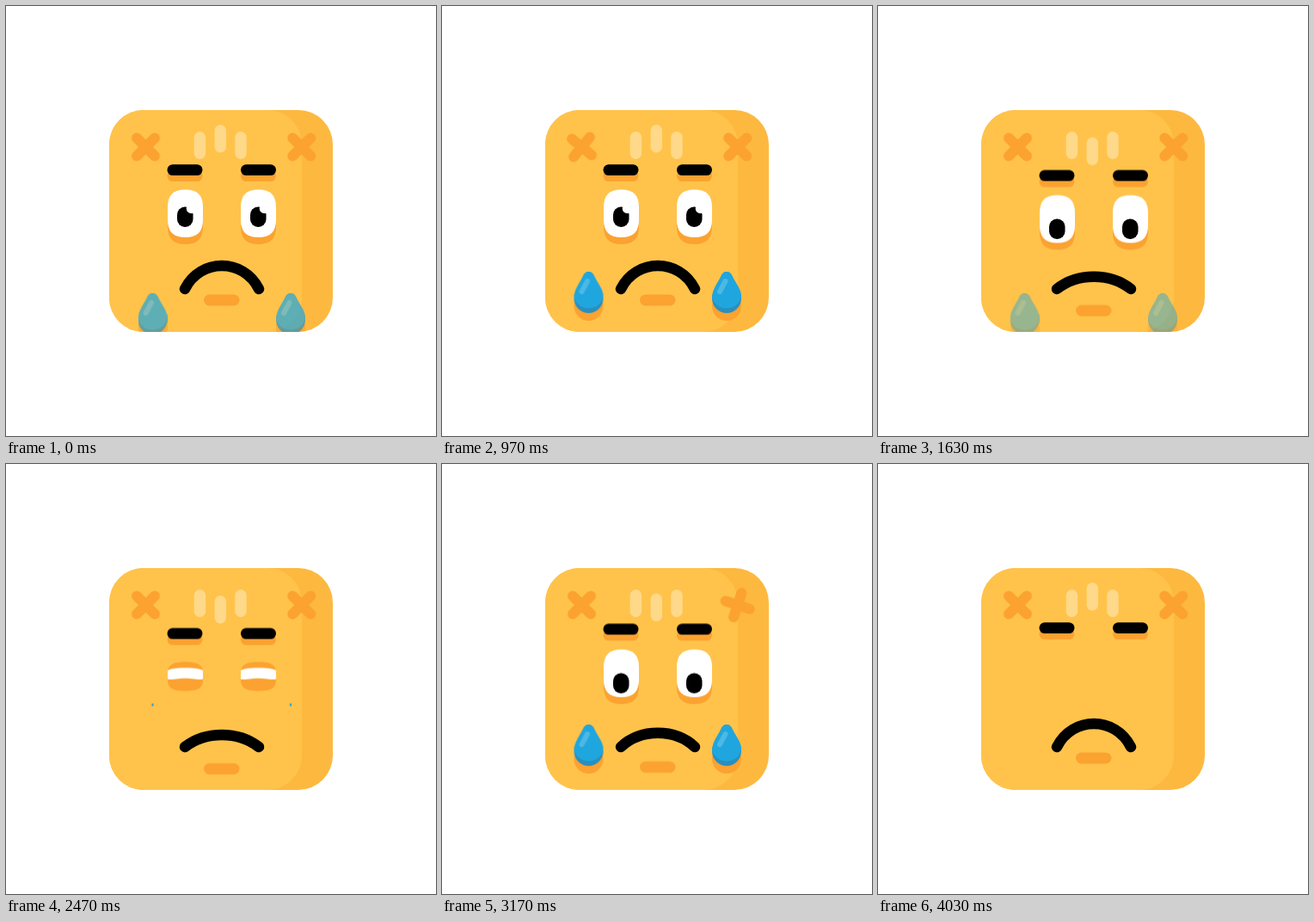
These frames come from a looping animation (500 px wide and 500 px high, 4060 ms). An HTML page without scripts:

```html
<!DOCTYPE html>
<html lang="en">
<head>
<meta charset="utf-8">
<title>Crying face</title>
<style>
html, body { margin: 0; width: 100%; height: 100%; overflow: hidden; background: #fff; }
svg { display: block; width: 100vw; height: 100vh; }

.shade { fill: #fba230; }
.cross { fill: none; stroke: #fba230; stroke-width: 12; stroke-linecap: round; }
.ray { fill: #ffd98a; }
.mouth { fill: none; stroke: #000; stroke-width: 12.5; stroke-linecap: round; }

.brows, .eyes, .look, .glint, .ray-mid, .chin, .mouth {
  animation: 4060ms ease-in-out infinite;
}
.lid, .white, .pupil, .fall, .drop, .turn-l, .turn-r {
  animation: 4060ms linear infinite;
}

/* Pose: up at both ends of the loop, down in the middle */
.brows { animation-name: brows; }
.eyes { animation-name: eyes; }
.ray-mid { animation-name: ray; }
.chin { animation-name: chin; }
.mouth { animation-name: mouth; }
@keyframes brows {
  0%, 25.86% { transform: none; }
  35.71%, 71.43% { transform: translateY(6.5px); }
  81.28%, 100% { transform: none; }
}
@keyframes eyes {
  0%, 25.86% { transform: none; }
  36.95%, 71.43% { transform: translateY(6.5px); }
  82.51%, 100% { transform: none; }
}
@keyframes ray {
  0%, 27.09% { transform: none; }
  41.87%, 73.89% { transform: translateY(15px); }
  88.67%, 100% { transform: none; }
}
@keyframes chin {
  0%, 27.09% { transform: none; }
  41.87%, 73.89% { transform: translateY(12.5px); }
  88.67%, 100% { transform: none; }
}
@keyframes mouth {
  0%, 27.09% { d: path("M208 329C226 293 276 293 294 329"); }
  41.87%, 73.89% { d: path("M208 329C232 310.3 270 310.3 294 329"); }
  88.67%, 100% { d: path("M208 329C226 293 276 293 294 329"); }
}

/* Gaze */
.look { animation-name: look; }
.glint { animation-name: glint; transform-origin: 215.5px 235.5px; }
@keyframes look {
  0%, 25.86% { transform: none; }
  36.95%, 83.74% { transform: translateY(7.5px); }
  93.6%, 100% { transform: none; }
}
@keyframes glint {
  0%, 25.86% { transform: none; }
  36.95%, 83.74% { transform: scale(0); }
  93.6%, 100% { transform: none; }
}

/* Blink: closed, slit, half, open */
.lid { fill: #fba230; animation-name: lid; }
.white { fill: #fff; animation-name: white; }
.pupil { transform-origin: 208.5px 240px; animation-name: pupil; }
@keyframes lid {
  0%, .738%, 16%, 47.78%, 65%, 97% {
    d: path("M188 242C188 228 194.5 221.5 208.5 221.5C222.5 221.5 229 228 229 242L229 256.5C229 270.5 222.5 277 208.5 277C194.5 277 188 270.5 188 256.5Z");
  }
  11.82%, 49.3%, 60.84%, 98.2% {
    d: path("M188 236C188 227 194.5 223.5 208.5 223.5C222.5 223.5 229 227 229 236L229 245C229 254 222.5 257.5 208.5 257.5C194.5 257.5 188 254 188 245Z");
  }
  10.59%, 59.6% {
    d: path("M188 233C188 225.5 194.5 223 208.5 223C222.5 223 229 225.5 229 233L229 234C229 241.5 222.5 244 208.5 244C194.5 244 188 241.5 188 234Z");
  }
  .739%, 9.11%, 50%, 58.1%, 99.2%, 100% {
    d: path("M188 233C188 233 194.5 233 208.5 233C222.5 233 229 233 229 233L229 233C229 233 222.5 233 208.5 233C194.5 233 188 233 188 233Z");
  }
}
@keyframes white {
  0%, .738%, 16%, 47.78%, 65%, 97% {
    d: path("M188 234C188 220 194.5 213.5 208.5 213.5C222.5 213.5 229 220 229 234L229 248.5C229 262.5 222.5 269 208.5 269C194.5 269 188 262.5 188 248.5Z");
  }
  11.82%, 49.3%, 60.84%, 98.2% {
    d: path("M188 234C188 232 198 230.5 208.5 230.5C219 230.5 229 232 229 234L229 243C229 245.5 219 242.5 208.5 242.5C198 242.5 188 245.5 188 243Z");
  }
  .739%, 10.59%, 50%, 59.6%, 99.2%, 100% {
    d: path("M188 237C188 237 198 237 208.5 237C219 237 229 237 229 237L229 237C229 237 219 237 208.5 237C198 237 188 237 188 237Z");
  }
}
@keyframes pupil {
  0%, .738%, 16%, 47.78%, 65%, 97% { transform: none; }
  .739%, 11.82%, 49.3%, 60.84%, 98.2%, 100% { transform: scale(0); }
}

/* Tears: two drops per loop */
.fall { animation-name: fall; }
.drop { transform-origin: 0 2px; animation-name: drop; }
@keyframes fall {
  0%, .738% { transform: translateY(334px); }
  .739%, 2.71% { transform: translateY(276.4px); }
  42.12% { transform: translateY(337px); }
  42.13%, 60.3% { transform: translateY(275.6px); }
  99.26%, 100% { transform: translateY(335.6px); }
}
@keyframes drop {
  0%, .738% { transform: none; opacity: .72; }
  .739%, 2.71% { transform: scale(0); opacity: 1; }
  11.33%, 37.93% { transform: none; opacity: 1; }
  42.12% { transform: none; opacity: 0; }
  42.13%, 60.3% { transform: scale(0); opacity: 1; }
  68.9%, 95.07% { transform: none; opacity: 1; }
  99.26%, 100% { transform: none; opacity: 0; }
}

/* Cheek crosses: half a turn each */
.turn-l { animation-name: turn-l; }
.turn-r { animation-name: turn-r; }
@keyframes turn-l {
  0%, 15.2% { transform: rotate(0deg); }
  33.8%, 100% { transform: rotate(180deg); }
}
@keyframes turn-r {
  0%, 71.55% { transform: rotate(0deg); }
  90.17%, 100% { transform: rotate(180deg); }
}
</style>
</head>
<body>
<svg viewBox="0 0 500 500">
  <defs>
    <clipPath id="head"><rect x="120" y="121" width="260" height="258" rx="40"/></clipPath>
    <path id="tear" d="M0 0C3 0 5 1.5 6.5 5C9.5 12 17 20.5 17 31A17 17 0 0 1 -17 31C-17 20.5 -9.5 12 -6.5 5C-5 1.5 -3 0 0 0Z"/>
    <path id="x" d="M-10.5 -10.5L10.5 10.5M10.5 -10.5L-10.5 10.5"/>
  </defs>

  <g clip-path="url(#head)">
    <rect x="120" y="121" width="260" height="258" fill="#fdb93f"/>
    <path d="M120 121H304A40 40 0 0 1 344 161V339A40 40 0 0 1 304 379H120Z" fill="#ffc34b"/>
  </g>

  <g class="cross">
    <g transform="translate(162.5 164)"><use href="#x" class="turn-l"/></g>
    <g transform="translate(343.7 164)"><use href="#x" class="turn-r"/></g>
  </g>

  <g class="ray">
    <rect x="218.7" y="146" width="13.4" height="32" rx="6.7"/>
    <rect class="ray-mid" x="242.6" y="138" width="13.4" height="32.5" rx="6.7"/>
    <rect x="266.3" y="146" width="13.4" height="32" rx="6.7"/>
  </g>

  <g class="brows">
    <g class="shade">
      <rect x="187.5" y="191.2" width="41" height="12.8" rx="6.4"/>
      <rect x="273" y="191.2" width="41" height="12.8" rx="6.4"/>
    </g>
    <rect x="187.5" y="184.2" width="41" height="12.8" rx="6.4"/>
    <rect x="273" y="184.2" width="41" height="12.8" rx="6.4"/>
  </g>

  <g class="eyes">
    <g>
      <path class="lid"/>
      <path class="white"/>
      <g class="pupil"><g class="look">
        <rect x="199" y="233.5" width="18.5" height="23.5" rx="9"/>
        <circle class="glint" cx="215.5" cy="235.5" r="5.8" fill="#fff"/>
      </g></g>
    </g>
    <g transform="translate(85 0)">
      <path class="lid"/>
      <path class="white"/>
      <g class="pupil"><g class="look">
        <rect x="199" y="233.5" width="18.5" height="23.5" rx="9"/>
        <circle class="glint" cx="215.5" cy="235.5" r="5.8" fill="#fff"/>
      </g></g>
    </g>
  </g>

  <rect class="shade chin" x="230" y="335.5" width="41.5" height="13" rx="6.5"/>
  <path class="mouth" d="M208 329C226 293 276 293 294 329"/>

  <g clip-path="url(#head)">
    <g transform="translate(170.5 0)"><g class="fall"><g class="drop">
      <use href="#tear" y="9" class="shade"/>
      <use href="#tear" fill="#2a8fbd"/>
      <path d="M0 0C3 0 5 1.5 6.5 5C9.5 12 17 20 17 28C14 47 -12 47 -17 30C-17 20.5 -9.5 12 -6.5 5C-5 1.5 -3 0 0 0Z" fill="#1fa6df"/>
      <path d="M-1.5 11L-8 23" stroke="#4cb8e5" stroke-width="6" stroke-linecap="round"/>
    </g></g></g>
    <g transform="translate(331 0)"><g class="fall"><g class="drop">
      <use href="#tear" y="9" class="shade"/>
      <use href="#tear" fill="#2a8fbd"/>
      <path d="M0 0C3 0 5 1.5 6.5 5C9.5 12 17 20 17 28C14 47 -12 47 -17 30C-17 20.5 -9.5 12 -6.5 5C-5 1.5 -3 0 0 0Z" fill="#1fa6df"/>
      <path d="M-1.5 11L-8 23" stroke="#4cb8e5" stroke-width="6" stroke-linecap="round"/>
    </g></g></g>
  </g>
</svg>
</body>
</html>
```
